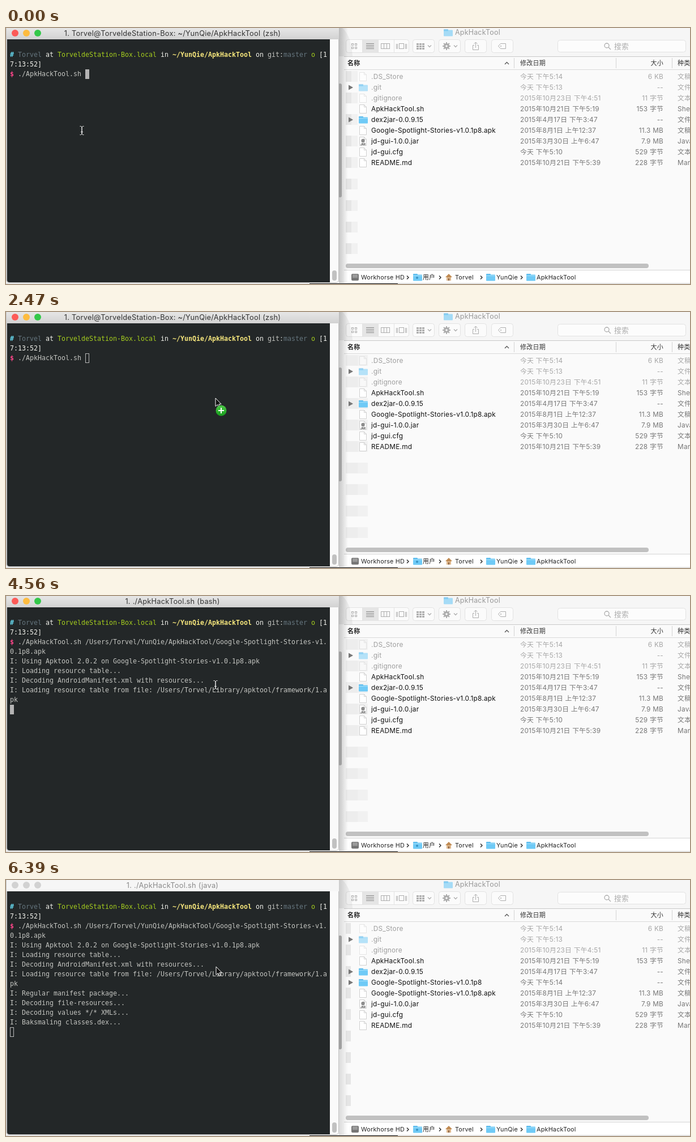
These frames come from a looping animation (1208x452 px, 8000 ms). An HTML page with a canvas:

```html
<!DOCTYPE html>
<html lang="zh">
<head>
<meta charset="utf-8">
<style>
html, body { margin: 0; width: 100%; height: 100%; overflow: hidden; background: #fafafa; }
canvas { display: block; }
</style>
</head>
<body>
<canvas id="stage" width="1208" height="452"></canvas>
<script>
const g = document.getElementById('stage').getContext('2d');
const LOOP = 8000;
const UI = 'Inter, "Noto Sans CJK SC", "Noto Sans CJK JP", sans-serif';
const MONO = '"DejaVu Sans Mono", monospace';
const USER = 'Torvel', HOST = 'TorveldeStation-Box', PROJECT = 'YunQie', TOOL = 'ApkHackTool';
const APP = 'Google-Spotlight-Stories-v1.0.1p8';
const CELL = 7, LINE = 17, COLS = 80;

// ---------- drawing helpers ----------
function rect(x, y, w, h, fill) { g.fillStyle = fill; g.fillRect(x, y, w, h); }

function round(x, y, w, h, r, fill, stroke) {
  g.beginPath();
  g.roundRect(x, y, w, h, r);
  if (fill) { g.fillStyle = fill; g.fill(); }
  if (stroke) { g.strokeStyle = stroke; g.lineWidth = 1; g.stroke(); }
}

function disc(x, y, r, fill, stroke) {
  g.beginPath();
  g.arc(x, y, r, 0, 7);
  if (fill) { g.fillStyle = fill; g.fill(); }
  if (stroke) { g.strokeStyle = stroke; g.stroke(); }
}

function poly(points, fill, stroke, width = 1) {
  g.beginPath();
  for (let i = 0; i < points.length; i += 2) g.lineTo(points[i], points[i + 1]);
  if (fill) { g.closePath(); g.fillStyle = fill; g.fill(); }
  if (stroke) { g.strokeStyle = stroke; g.lineWidth = width; g.stroke(); }
}

function gradient(x0, y0, x1, y1, from, to) {
  const fill = g.createLinearGradient(x0, y0, x1, y1);
  fill.addColorStop(0, from);
  fill.addColorStop(1, to);
  return fill;
}

function label(text, x, y, color = '#111', size = 11.8, align = 'left', weight = '') {
  g.font = `${weight} ${size}px ${UI}`;
  g.letterSpacing = size * 0.02 + 'px';
  g.textAlign = align;
  g.fillStyle = color;
  g.fillText(text, x, y);
}

// ---------- icons ----------
function folder(x, y) {
  round(x, y - 6, 8, 4, 1, '#5bb8ea');
  round(x, y - 4.5, 16, 11, 1, '#6fcaf6');
  rect(x, y - 3, 16, 1, '#a3def9');
}

function page(x, y) {
  poly([x + 2, y - 7.5, x + 9.5, y - 7.5, x + 13.5, y - 3.5, x + 13.5, y + 7.5, x + 1.5, y + 7.5, x + 1.5, y - 7.5], '#fff', '#cfcfcf');
  poly([x + 9.5, y - 7.5, x + 9.5, y - 3.5, x + 13.5, y - 3.5], null, '#cfcfcf');
}

function jar(x, y) {
  page(x, y);
  disc(x + 7.5, y - 1, 3.2, '#8c8c8c');
  label('JAR', x + 7.5, y + 6.5, '#444', 4.5, 'center', 'bold');
}

const ICONS = { folder, page, jar };

// ---------- file browser ----------
const FILES = [
  ['page', '.DS_Store', '今天 下午5:14', '6 KB', '文稿', 1],
  ['folder', '.git', '今天 下午5:13', '--', '文件夹', 1],
  ['page', '.gitignore', '2015年10月23日 下午4:51', '11 字节', '文本', 1],
  ['page', TOOL + '.sh', '2015年10月21日 下午5:19', '153 字节', 'Shell 脚本'],
  ['folder', 'dex2jar-0.0.9.15', '2015年4月17日 下午3:47', '--', '文件夹'],
  ['page', APP + '.apk', '2015年8月1日 上午12:37', '11.3 MB', '文稿'],
  ['jar', 'jd-gui-1.0.0.jar', '2015年3月30日 上午6:47', '7.9 MB', 'Java JAR'],
  ['page', 'jd-gui.cfg', '今天 下午5:10', '529 字节', '文本'],
  ['page', 'README.md', '2015年10月21日 下午5:39', '228 字节', 'Markdown']
];

function fileRow([icon, name, date, size, kind, hidden], y, expandable) {
  if (expandable) poly([605, y - 4.5, 613, y, 605, y + 4.5], '#777');
  g.save();
  if (hidden) g.globalAlpha *= 0.5;
  ICONS[icon](623, y);
  label(name, 645, y + 4, hidden ? '#444' : '#111');
  const tone = hidden ? '#555' : '#777';
  label(date, 908, y + 4, tone);
  label(size, 1161, y + 4, tone, 11.8, 'right');
  label(kind, 1186, y + 4, tone);
  g.restore();
}

function toolbar() {
  rect(588, 0, 620, 50, '#f6f6f6');
  g.globalAlpha = 0.6;
  folder(773, 8);
  g.globalAlpha = 1;
  label(TOOL, 793, 12, '#999', 12.4);

  const edge = '#e2e2e2', ink = '#adadad';
  const buttons = [[600, 112], [718, 39], [764, 39], [810, 39], [857, 39]];
  for (const [x, w] of buttons) round(x + 0.5, 20.5, w - 1, 23, 4, '#fbfbfb', edge);
  rect(630, 21, 27, 23, '#e5e5e5');
  for (const x of [629, 657, 685]) rect(x, 21, 1, 23, edge);
  for (const dx of [0, 6]) for (const dy of [0, 6]) {
    g.strokeStyle = ink;
    g.strokeRect(610.5 + dx, 27.5 + dy, 3, 3);
  }
  for (let i = 0; i < 4; i++) rect(636, 27 + i * 3, 14, 1, '#858585');
  g.strokeStyle = ink;
  for (let i = 0; i < 3; i++) g.strokeRect(662.5 + i * 5, 27.5, 5, 9);
  g.strokeRect(694.5, 27.5, 8, 9);
  for (const x of [689, 691, 705, 707]) rect(x, 28, 1, 9, ink);
  for (let i = 0; i < 9; i++) rect(725 + i % 3 * 5, 27 + Math.floor(i / 3) * 4, 4, 3, ink);
  for (const x of [745, 791]) poly([x, 30.5, x + 3, 33.5, x + 6, 30.5], null, ink, 1.3);
  for (let i = 0; i < 8; i++) {
    const a = i * Math.PI / 4;
    poly([778, 32, 778 + 7 * Math.cos(a), 32 + 7 * Math.sin(a)], null, ink, 2);
  }
  disc(778, 32, 5, ink);
  disc(778, 32, 1.8, '#fbfbfb');
  poly([827, 30.5, 824.5, 30.5, 824.5, 38.5, 834.5, 38.5, 834.5, 30.5, 832, 30.5], null, ink);
  poly([829.5, 35, 829.5, 25.5], null, ink);
  poly([826.5, 28, 829.5, 25, 832.5, 28], null, ink);
  poly([869.5, 32, 873.5, 27.5, 882.5, 27.5, 882.5, 36.5, 873.5, 36.5, 869.5, 32], null, ink);
  disc(874, 32, 1, ink);

  round(974.5, 21.5, 226, 21, 4, '#fcfcfc', edge);
  g.lineWidth = 1.3;
  disc(1061, 31, 4, null, ink);
  poly([1064, 34, 1068, 38], null, ink, 1.3);
  label('搜索', 1074, 36.5, '#adadad', 12.7);
}

function pathBar() {
  rect(597, 427, 611, 23, '#fff');
  rect(597, 427, 611, 1, '#d4d4d4');
  round(610, 434, 13, 12, 2, '#777');
  rect(612, 435, 9, 6, '#9b9b9b');
  folder(719, 440);
  disc(726, 441, 2, '#3994c4');
  poly([776, 440, 782, 434, 788, 440], '#c08a52');
  rect(778, 440, 8, 6, '#dcb68c');
  rect(781, 442, 2, 4, '#8a6040');
  folder(848, 440);
  folder(919, 440);
  [['Workhorse HD', 627], ['用户', 736], [USER, 793], [PROJECT, 866], [TOOL, 937]]
    .forEach(([text, x]) => label(text, x, 444, '#222', 10.8));
  for (const x of [708, 765, 838, 909]) poly([x, 437.5, x + 3, 440.5, x, 443.5], null, '#222', 1.3);
}

function browser(t) {
  rect(0, 0, 1208, 452, '#fafafa');
  toolbar();
  rect(597, 50, 611, 1, '#c9c9c9');
  rect(597, 73, 611, 1, '#d9d9d9');
  for (const x of [897, 1077, 1176]) rect(x, 53, 1, 18, '#d3d3d3');
  label('名称', 603, 66, '#222', 11, 'left', 'bold');
  label('修改日期', 908, 66, '#333', 11);
  label('大小', 1161, 66, '#333', 11, 'right');
  label('种类', 1186, 66, '#333', 11);
  poly([881, 64, 884.5, 60.5, 888, 64], null, '#555', 1.3);

  const [inner, outer] = t >= 5040 ? [609, 609] : t >= 2170 && t < 4860 ? [621, 639] : [610, 621];
  for (let y = 76; y < 399; y += 38) {
    rect(600, y, outer - 600, 19, '#f1f1f1');
    rect(600, y, inner - 600, 19, inner > 610 ? '#ededed' : '#e6e6e6');
  }

  if (t >= 2170 && t < 2320) round(636, 172, 234, 17, 8, '#d4e3f9');
  const shift = t < 4710 ? 0 : t < 4860 ? 7 : 19;
  FILES.forEach((file, i) => fileRow(file, 86 + i * 19 + (i > 4 ? shift : 0), file[0] === 'folder'));
  if (shift) {
    const done = t >= 5520;
    g.globalAlpha = shift < 19 ? 0.3 : 1;
    fileRow([done ? 'folder' : 'page', APP, '今天 下午5:14', '--', done ? '文件夹' : '--'], 181, true);
    g.globalAlpha = 1;
  }
  round(600, 416, 535, 8, 4, '#c1c1c1');
  pathBar();
  rect(0, 450, 1208, 2, '#e3e3e3');
  rect(536, 451, 156, 1, '#111');
}

// ---------- terminal ----------
const DIM = '#65757e', WHITE = '#f2f2ec', GREEN = '#a4cc1e', PLAIN = '#c3c4c0';
const PROMPT = [
  ['# ', '#66d9ef', 1], [USER, DIM], [' at ', WHITE], [HOST + '.local', GREEN], [' in ', WHITE],
  [`~/${PROJECT}/${TOOL}`, '#f6e67c', 1], [' on ', WHITE], ['git:', PLAIN], ['master', DIM],
  [' o', GREEN], [' [17:13:52]\n', WHITE], ['$ ', '#fa4688', 1], [`./${TOOL}.sh `, PLAIN]
];
const OUTPUT = [
  [2620, `/Users/${USER}/${PROJECT}/${TOOL}/${APP}.apk `],
  [4120, '\n'],
  [4270, `I: Using Apktool 2.0.2 on ${APP}.apk\nI: Loading resource table...\n`],
  [4420, `I: Decoding AndroidManifest.xml with resources...\nI: Loading resource table from file: /Users/${USER}/Library/apktool/framework/1.apk\n`],
  [4860, 'I: Regular manifest package...\n'],
  [5040, 'I: Decoding file-resources...\n'],
  [6210, 'I: Decoding values */* XMLs...\n'],
  [6390, 'I: Baksmaling classes.dex...\n']
];

function terminalText(t) {
  let col = 0, row = 0;
  const x = () => 7 + col * CELL, y = () => 39 + row * LINE;
  const newline = () => { col = 0; row++; };
  const print = ([text, color, bold]) => {
    g.font = `${bold ? 'bold ' : ''}11.63px ${MONO}`;
    g.letterSpacing = '0px';
    g.textAlign = 'left';
    g.fillStyle = color;
    for (const ch of text) {
      if (ch === '\n') { newline(); continue; }
      if (col === COLS) newline();
      g.fillText(ch, x(), y() + 12);
      col++;
    }
  };
  PROMPT.forEach(print);
  for (const [start, text] of OUTPUT) if (t >= start) print([text, PLAIN]);

  if (t >= 5040 || t >= 2170 && t < 2620) {
    g.strokeStyle = '#b8b8b8';
    g.lineWidth = 1;
    g.strokeRect(x() + 0.5, y() + 0.5, 6, 16);
  } else rect(x(), y(), 7, 17, '#b4b4b4');
}

function terminal(t) {
  const active = t < 5040;
  // Soft edge of the window behind, curving out along the toolbar
  g.beginPath();
  g.moveTo(588, 0);
  g.lineTo(594, 0);
  g.quadraticCurveTo(610, 14, 612, 50);
  g.lineTo(588, 50);
  g.fillStyle = 'rgba(0,0,0,0.05)';
  g.fill();
  rect(588, 0, 16, 450, gradient(588, 0, 604, 0, `rgba(0,0,0,${active ? 0.2 : 0.13})`, 'rgba(0,0,0,0)'));
  round(587, 98, 6, 201, 3, '#a0a0a0');
  round(0, -6, 588, 456, 5, '#c4c4c4');
  rect(1, 0, 587, 20, active ? gradient(0, 0, 0, 20, '#e6e6e6', '#d2d2d2') : '#f6f6f6');
  round(2, 20, 585, 429, [0, 0, 4, 4], '#fafafa');
  round(2, 20, 570, 429, [0, 0, 0, 4], '#232728');
  round(576, 428, 8, 18, 4, '#c1c1c1');
  ['#fc5b57', '#fdbc40', '#34c84a'].forEach((color, i) =>
    disc(16 + i * 20, 9, 6, active ? color : '#d2d2d2'));
  const shell = t >= 4560 && t < 5520 ? 'bash' : 'java';
  const title = t < 4270 ? `1. ${USER}@${HOST}: ~/${PROJECT}/${TOOL} (zsh)` : `1. ./${TOOL}.sh (${shell})`;
  label(title, 294, 14, active ? '#333' : '#8a8a8a', 12.8, 'center');
  terminalText(t);
}

// ---------- mouse pointer ----------
const POINTER = [
  [0, 'beam', 134, 181], [600, 'beam', 326, 178], [840, 'beam', 474, 192], [990, 'beam', 555, 203],
  [1140, 'arrow', 585, 193], [1290, 'arrow', 622, 185], [1440, 'arrow', 627, 184], [1580, 'arrow', 629, 184],
  [1730, 'arrow', 632, 184], [2170, 'copy', 546, 175], [2320, 'copy', 447, 161], [2470, 'copy', 370, 152],
  [2620, 'beam', 370, 157], [4860, 'arrow', 371, 153]
];

function pointer(t) {
  const [, type, x, y] = POINTER.findLast(step => t >= step[0]);
  g.save();
  g.translate(x, y);
  if (type === 'beam') {
    for (const side of [-1, 1]) {
      poly([side * 3.5, -7.5, side * 1.5, -7.5, 0, -6, 0, 6, side * 1.5, 7.5, side * 3.5, 7.5], null, '#e8e8e8', 1);
    }
    poly([-2, 2.5, 2, 2.5], null, '#e8e8e8');
  } else {
    poly([0, 0, 0, 14.5, 3.5, 11.5, 6, 16.5, 8, 15.5, 5.8, 10.8, 10, 10.5, 0, 0], '#111', '#fff', 1);
    if (type === 'copy') {
      disc(10, 22, 9.5, gradient(0, 12, 0, 32, '#4fca49', '#159b1b'));
      rect(5, 21, 10, 2, '#fff');
      rect(9, 17, 2, 10, '#fff');
    }
  }
  g.restore();
}

function frame() {
  const t = performance.now() % LOOP;
  browser(t);
  terminal(t);
  pointer(t);
  requestAnimationFrame(frame);
}
frame();
</script>
</body>
</html>
```
